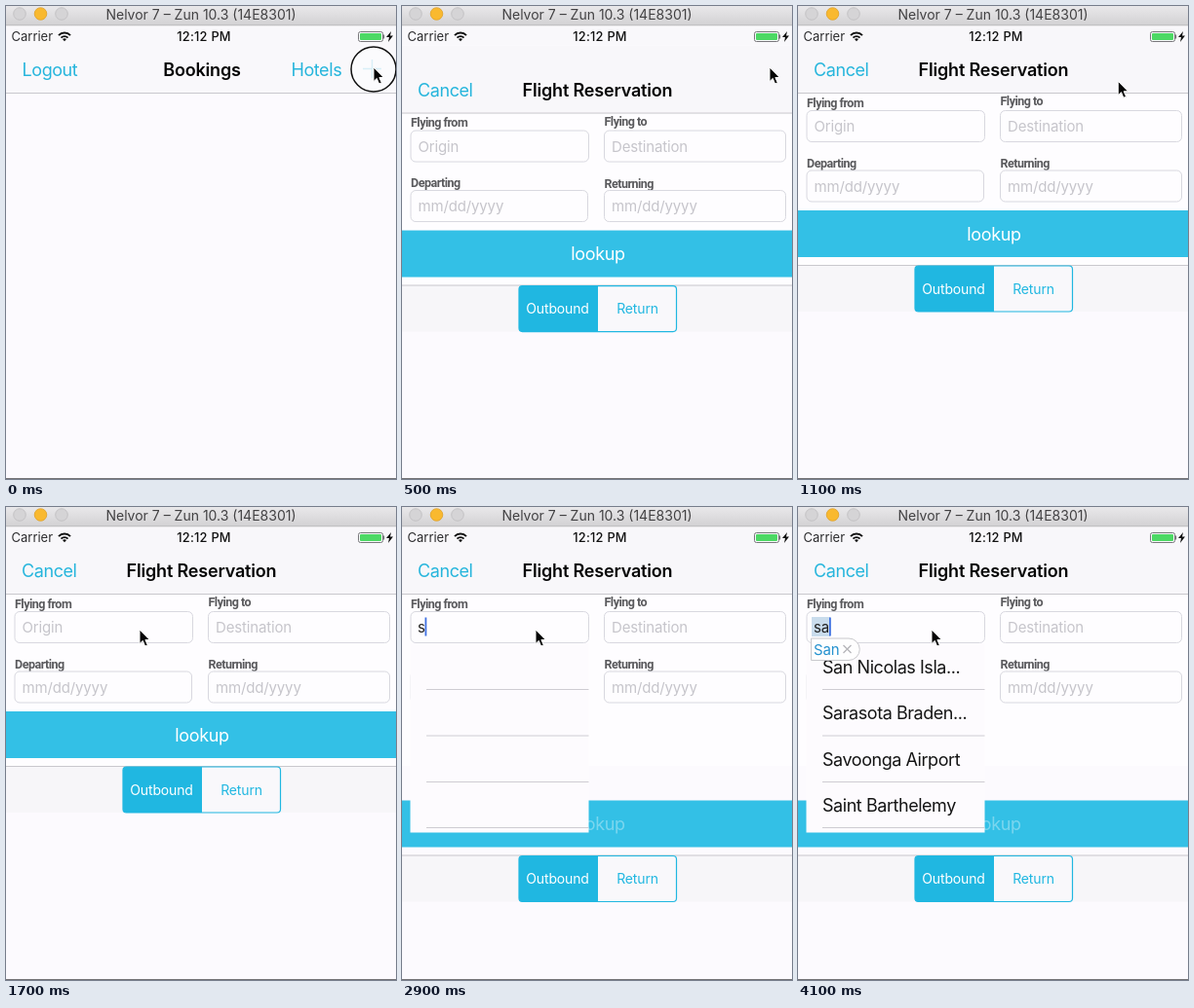
These frames come from a looping animation (400 px wide and 486 px high, 4.2 s). An HTML page:

```html
<!DOCTYPE html>
<html lang="en">
<head>
<meta charset="utf-8">
<title>Flight booking</title>
<style>
  html, body { margin: 0; width: 100%; height: 100%; overflow: hidden; background: #fcfafe; }
  svg { display: block; width: 400px; height: 486px; }
  text { font-family: Inter, Roboto, sans-serif; white-space: pre; }
  .nav { font-size: 18px; letter-spacing: -.42px; fill: #25b5dc; }
  .title { font-size: 18px; letter-spacing: -.18px; font-weight: 600; fill: #050505; text-anchor: middle; }
  .label { font: bold 12.5px Roboto, sans-serif; letter-spacing: -.5px; fill: #59595c; }
  .hint { font-size: 15px; letter-spacing: -.15px; fill: #c6c5cb; }
  .typed { font-size: 15px; letter-spacing: -.15px; fill: #222; }
  .row { font-size: 18px; letter-spacing: -.45px; fill: #151515; }
  .seg { font-size: 14px; letter-spacing: -.15px; text-anchor: middle; }
  .field { fill: #fefdff; stroke: #d8d8df; }
  .line { stroke: #c9c8cd; }
</style>
</head>
<body>
<svg viewBox="0 0 400 486">
  <defs>
    <linearGradient id="chrome" x2="0" y2="1">
      <stop stop-color="#e9e8ea"/><stop offset="1" stop-color="#d2d1d3"/>
    </linearGradient>
  </defs>

  <rect width="400" height="486" fill="#fcfafe"/>
  <rect y="20" width="400" height="70" fill="#f9f8fb"/>
  <path class="line" d="M0 89.5H400"/>
  <text class="nav" x="16.5" y="72">Logout</text>
  <text class="title" x="201" y="72">Bookings</text>
  <text class="nav" x="292.5" y="72">Hotels</text>
  <path id="plus" d="M366 64.5h19M375.5 55v19" stroke="#25b5dc" stroke-width="1.4"/>

  <g id="modal">
    <rect y="20" width="400" height="466" fill="#fcfafe"/>
    <rect y="20" width="400" height="70" fill="#f8f7fa"/>
    <rect y="90" width="400" height="176" fill="#fefdff"/>
    <path class="line" d="M0 89.5H400"/>
    <text class="nav" x="16" y="72">Cancel</text>
    <text class="title" x="200.5" y="72">Flight Reservation</text>
    <g id="fields"></g>
    <g id="lower">
      <rect y="210" width="400" height="48" fill="#33c0e6"/>
      <text id="lookup" x="201" y="240.5" font-size="18" letter-spacing="-.3" text-anchor="middle" fill="#fff">lookup</text>
      <rect y="266" width="400" height="48" fill="#f7f6f9"/>
      <path class="line" d="M0 266.5H400"/>
      <rect x="120" y="267" width="161.5" height="47" rx="3.5" fill="#f9f8fb" stroke="#20b7e1" stroke-width="1.2"/>
      <path d="M201 267H123.5a3.5 3.5 0 0 0-3.5 3.5v40a3.5 3.5 0 0 0 3.5 3.5H201z" fill="#20b7e1"/>
      <text class="seg" x="159.5" y="295.5" fill="#fff">Outbound</text>
      <text class="seg" x="241.5" y="295.5" fill="#20b7e1">Return</text>
    </g>
    <g id="drop">
      <rect x="8.5" y="140" width="183" height="194.5" fill="#fdfbfe"/>
      <path class="line" d="M25 187.5H191.5M25 235H191.5M25 282.5H191.5M25 329.5H191.5" stroke-width=".9"/>
      <g id="rows"></g>
      <rect id="mark" x="14" y="113" width="19" height="20" fill="#c9dcec"/>
      <text id="typed" class="typed" x="16" y="129"></text>
      <rect id="caret" y="113.5" width="1.8" height="19" fill="#3f70e2"/>
      <g id="tip">
        <path d="M13.5 135V157.5H52a11 11 0 0 0 0-22.5z" fill="#fefefe" stroke="#c9c9cd"/>
        <text x="16" y="151.5" font-size="15" letter-spacing="-.2" fill="#2592cf">San</text>
        <path d="M46.5 142l8 8M54.5 142l-8 8" stroke="#b5b5b9" stroke-width="1.3"/>
      </g>
    </g>
  </g>

  <text x="5.5" y="36" font-size="13" fill="#2c2c2e">Carrier</text>
  <path d="M54 30.2a8 8 0 0 1 12 0M56.5 32.6a4.9 4.9 0 0 1 7 0" fill="none" stroke="#111" stroke-width="1.9"/>
  <path d="M60 36.3l-2-2.2a2.9 2.9 0 0 1 4 0z" fill="#111"/>
  <text x="203" y="36" font-size="12.8" font-weight="500" letter-spacing=".25" text-anchor="middle" fill="#111">12:12 PM</text>
  <rect x="361.5" y="26.5" width="25" height="10" rx="2" fill="none" stroke="#77777a"/>
  <rect x="363" y="28" width="22" height="7" rx="1" fill="#4cd964"/>
  <path d="M387.5 29.5v4" stroke="#77777a" stroke-width="1.3"/>
  <path d="M395 26l-5 6h3l-1 5 5-6.5h-3z" fill="#111"/>

  <rect width="400" height="20" fill="url(#chrome)"/>
  <path d="M0 19.8H400" stroke="#b7b6b8" stroke-width=".8"/>
  <g fill="#d5d4d6" stroke="#bebdbf" stroke-width=".8">
    <circle cx="14" cy="8" r="6.3"/>
    <circle cx="35.5" cy="8" r="6.3" fill="#f9b92f" stroke="#dfa12a"/>
    <circle cx="57" cy="8" r="6.3"/>
  </g>
  <text x="200" y="14" font-size="14" text-anchor="middle" fill="#424143">Nelvor 7 – Zun 10.3 (14E8301)</text>
  <path d="M0 485.5H400" stroke="#747376"/>

  <g id="pointer">
    <circle id="press" r="23" cy="2" fill="#fff" fill-opacity=".35" stroke="#111" stroke-width="1.5"/>
    <path d="M0 0V14.5L3.3 11.4 5.6 17 8.3 15.9 5.9 10.5H10.3z" fill="#050505" stroke="#fff"/>
  </g>
</svg>
<script>
  const $ = id => document.getElementById(id);
  const LOOP = 4200, STEP = 100;
  const OPEN = 2000, TYPE_S = 2800, LIST_S = 3200, TYPE_A = 3800, LIST_A = 4000;

  // label, label baseline, hint, x, y, width
  const fields = [
    ['Flying from', 103.5, 'Origin', 9, 107.5, 182.5],
    ['Flying to', 102, 'Destination', 207.5, 107.5, 186],
    ['Departing', 165.5, 'mm/dd/yyyy', 9, 169, 181.5],
    ['Returning', 166, 'mm/dd/yyyy', 207.5, 169, 186]
  ];
  $('fields').innerHTML = fields.map(([label, base, hint, x, y, w]) => `
    <text class="label" x="${x}" y="${base}">${label}</text>
    <rect class="field" x="${x}" y="${y}" width="${w}" height="32" rx="5"/>
    <text class="hint" x="${x + 7.5}" y="${y + 21.5}">${hint}</text>`).join('');
  const origin = $('fields').querySelector('.hint');

  const lists = {
    s: ['Sud Corse', 'San Nicolas Isla...', 'Sierra Vista Mun...', 'St Clair Co Intl'],
    sa: ['San Nicolas Isla...', 'Sarasota Braden...', 'Savoonga Airport', 'Saint Barthelemy']
  };
  for (const key in lists) {
    const rows = lists[key].map((name, i) =>
      `<text class="row" x="25" y="${171 + i * 47.4}">${name}</text>`).join('');
    $('rows').innerHTML += `<g id="list-${key}">${rows}</g>`;
  }

  // time, x, y of the pointer tip
  const path = [
    [0, 377, 63], [800, 377, 63], [1200, 312, 82], [1400, 212, 112], [1600, 137, 126], [LOOP, 137, 126]
  ];
  function pointerAt(t) {
    const i = path.findIndex(p => p[0] > t);
    const [t0, x0, y0] = path[i - 1], [t1, x1, y1] = path[i];
    const k = (t - t0) / (t1 - t0);
    return [x0 + (x1 - x0) * k, y0 + (y1 - y0) * k];
  }

  // critically damped slide from the bottom edge
  function slide(t) {
    const u = Math.max(0, t - 217) * 0.0173;
    const y = 466 * (1 + u) * Math.exp(-u);
    return y < 0.3 ? 0 : y;
  }

  function pressAt(t) {
    if (t < 200) return t < 100 ? 1 : 0.6;
    return t >= 1800 && t < 2000 ? 1 : 0;
  }

  function blink(age) {
    const phase = age % 1000;
    return phase < 600 ? 1 : phase < 800 ? 1 - (phase - 600) / 200 : 0;
  }

  const show = (el, on) => el.setAttribute('visibility', on ? 'visible' : 'hidden');
  const fade = (el, a) => el.setAttribute('opacity', a);
  const move = (el, x, y) => el.setAttribute('transform', `translate(${x} ${y})`);

  function draw(t) {
    const open = t >= OPEN, s = t >= TYPE_S, a = t >= TYPE_A;
    move($('modal'), 0, slide(t));
    move($('pointer'), ...pointerAt(t));
    fade($('press'), pressAt(t));
    fade($('plus'), t < 100 ? 0.25 : t < 200 ? 0.5 : 1);
    move($('lower'), 0, open ? 91.5 : 0);
    fade($('lookup'), s ? 0.35 : 1);
    $('drop').setAttribute('display', open ? 'inline' : 'none');
    show(origin, !s);
    $('typed').textContent = a ? 'sa' : s ? 's' : '';
    $('caret').setAttribute('x', a ? 32 : s ? 23.5 : 16);
    fade($('caret'), blink(t - (a ? TYPE_A : s ? TYPE_S : OPEN)));
    show($('list-s'), t >= LIST_S && t < LIST_A);
    show($('list-sa'), t >= LIST_A);
    show($('mark'), t >= LIST_A);
    show($('tip'), t >= LIST_A);
  }

  const start = performance.now();
  function tick() {
    const t = (performance.now() - start) % LOOP;
    draw(Math.floor(t / STEP) * STEP);
    requestAnimationFrame(tick);
  }
  tick();
</script>
</body>
</html>
```
